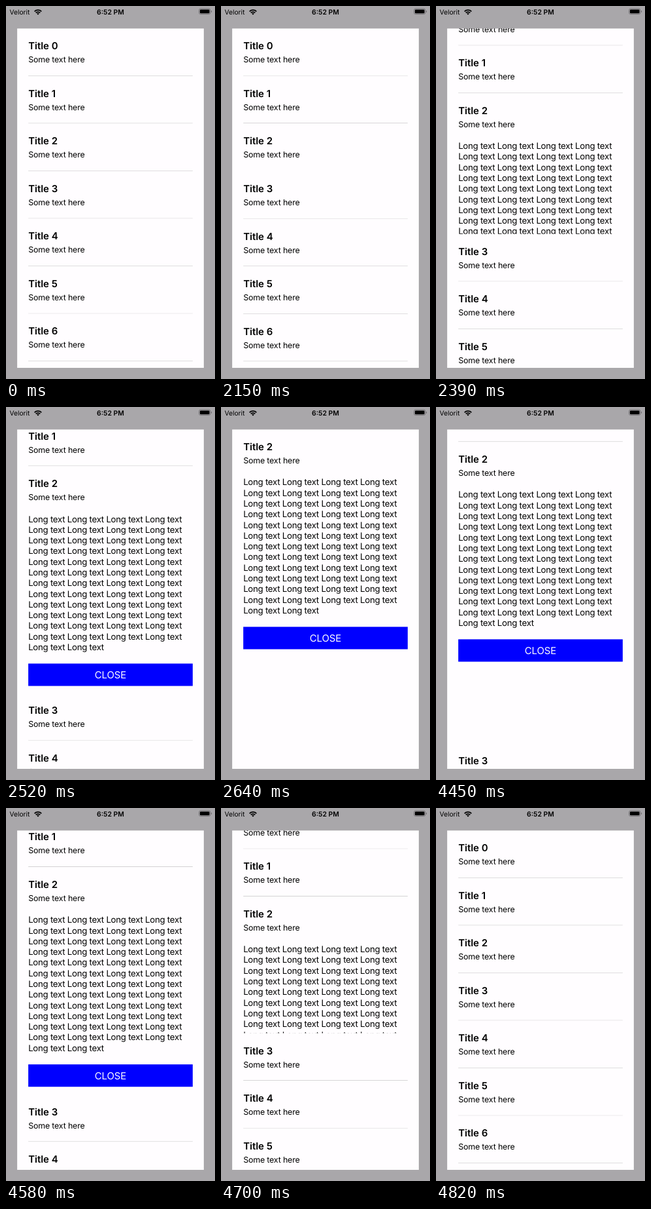
Animation of 320x569 px, one loop 5670 ms. Source, as an HTML page:

```html
<!DOCTYPE html>
<html lang="en">
<head>
<meta charset="utf-8">
<title>Expanding list</title>
<style>
  html, body { margin: 0; width: 100%; height: 100%; overflow: hidden; background: #a9a7aa; }
  #stage { display: block; width: 100vw; height: 100vh; }
  text { font-family: Inter, Roboto, sans-serif; text-rendering: geometricPrecision; white-space: pre; }
  .title { font-size: 17.5px; font-weight: 600; }
  .detail { font-size: 14.55px; letter-spacing: -.2px; }
  .long { font-size: 15.5px; letter-spacing: -.3px; }
  .button { font-size: 17.5px; letter-spacing: -.1px; fill: #fff; text-anchor: middle; }
  .network { font-size: 12px; }
  .clock { font-size: 12.2px; font-weight: 600; text-anchor: middle; }
</style>
</head>
<body>
<svg id="stage" viewBox="0 0 375 667" preserveAspectRatio="xMinYMin slice">
  <text class="network" x="6.4" y="14.8">Velorit</text>
  <g fill="none" stroke="#000" stroke-width="2">
    <path d="M51.1 9.2a8.9 8.9 0 0 1 12.6 0" transform="translate(0 .6)"/>
    <path d="M53.5 12.2a5.5 5.5 0 0 1 7.8 0"/>
  </g>
  <path d="M57.4 15.8l-2.1-2.1a3 3 0 0 1 4.2 0z"/>
  <text class="clock" x="187.5" y="14.8">6:52 PM</text>
  <rect x="346.4" y="4.9" width="20.2" height="9.8" rx="2.6" fill="none" stroke="#6f6d70"/>
  <rect x="347.9" y="6.4" width="17.2" height="6.8" rx="1.4"/>
  <path d="M367.9 8v3.8a2 2 0 0 0 0-3.8z" fill="#6f6d70"/>
  <svg id="card" x="20" y="40" width="335" height="607">
    <rect width="335" height="607" fill="#fffdff"/>
  </svg>
</svg>
<script>
const LOOP = 5670, CLOSED = 85, OPEN = 607, SELECTED = 2, ROWS = 8;
const DURATION = 500, STEP = 30;
// lead: progress already made at the first step; cut: end of the one longer step
const opening = { at: 2150, lead: 12, cut: 490 };
const closing = { at: 4330, lead: 31, cut: 250 };

function add(parent, tag, attrs, content = '') {
  const node = document.createElementNS('http://www.w3.org/2000/svg', tag);
  for (const key in attrs) node.setAttribute(key, attrs[key]);
  node.textContent = content;
  return parent.appendChild(node);
}

const label = (row, kind, y, content, x = 20) => add(row, 'text', { class: kind, x, y }, content);

const card = document.getElementById('card');
const rows = Array.from({ length: ROWS }, (_, i) => {
  const row = add(card, 'svg', { x: 0, y: i * CLOSED, width: 335, height: CLOSED, overflow: 'hidden' });
  label(row, 'title', 37.5, `Title ${i}`);
  label(row, 'detail', 61, 'Some text here');
  return row;
});
const separators = rows.map(row =>
  add(row, 'rect', { x: 20, y: 84.5, width: 295, height: .5, fill: '#999' }));

const body = add(rows[SELECTED], 'g', {});
for (let line = 0; line < 13; line++) {
  const words = Array(line < 12 ? 4 : 2).fill('Long text').join(' ');
  label(body, 'long', 100 + line * 19.09, words);
}
add(body, 'rect', { x: 20, y: 353, width: 295, height: 40, fill: '#00f' });
label(body, 'button', 379.4, 'CLOSE', 167.5);

// cubic-bezier(.42, 0, 1, 1)
function easeIn(x) {
  if (x >= 1) return 1;
  let low = 0, high = 1;
  for (let i = 0; i < 24; i++) {
    const s = (low + high) / 2;
    if (s * (1.26 + s * (.48 - .74 * s)) < x) low = s; else high = s;
  }
  return low * low * (3 - 2 * low);
}

function progress(time, { at, lead, cut }) {
  const elapsed = time - at;
  if (elapsed < 0) return 0;
  const held = elapsed < cut
    ? Math.min(Math.floor(elapsed / STEP) * STEP, cut - 10 - STEP)
    : cut + Math.floor((elapsed - cut) / STEP) * STEP;
  return easeIn((held + lead) / DURATION);
}

function draw(time) {
  const openness = progress(time, opening) - progress(time, closing);
  const growth = (OPEN - CLOSED) * openness;
  const scroll = SELECTED * CLOSED * openness;
  rows.forEach((row, i) =>
    row.setAttribute('y', i * CLOSED - scroll + (i > SELECTED ? growth : 0)));
  rows[SELECTED].setAttribute('height', CLOSED + growth);
  const expanded = openness > 0;
  body.setAttribute('visibility', expanded ? 'visible' : 'hidden');
  separators[SELECTED].setAttribute('visibility', expanded ? 'hidden' : 'visible');
}

const start = performance.now();
function tick() {
  draw((performance.now() - start) % LOOP);
  requestAnimationFrame(tick);
}
tick();
</script>
</body>
</html>
```
